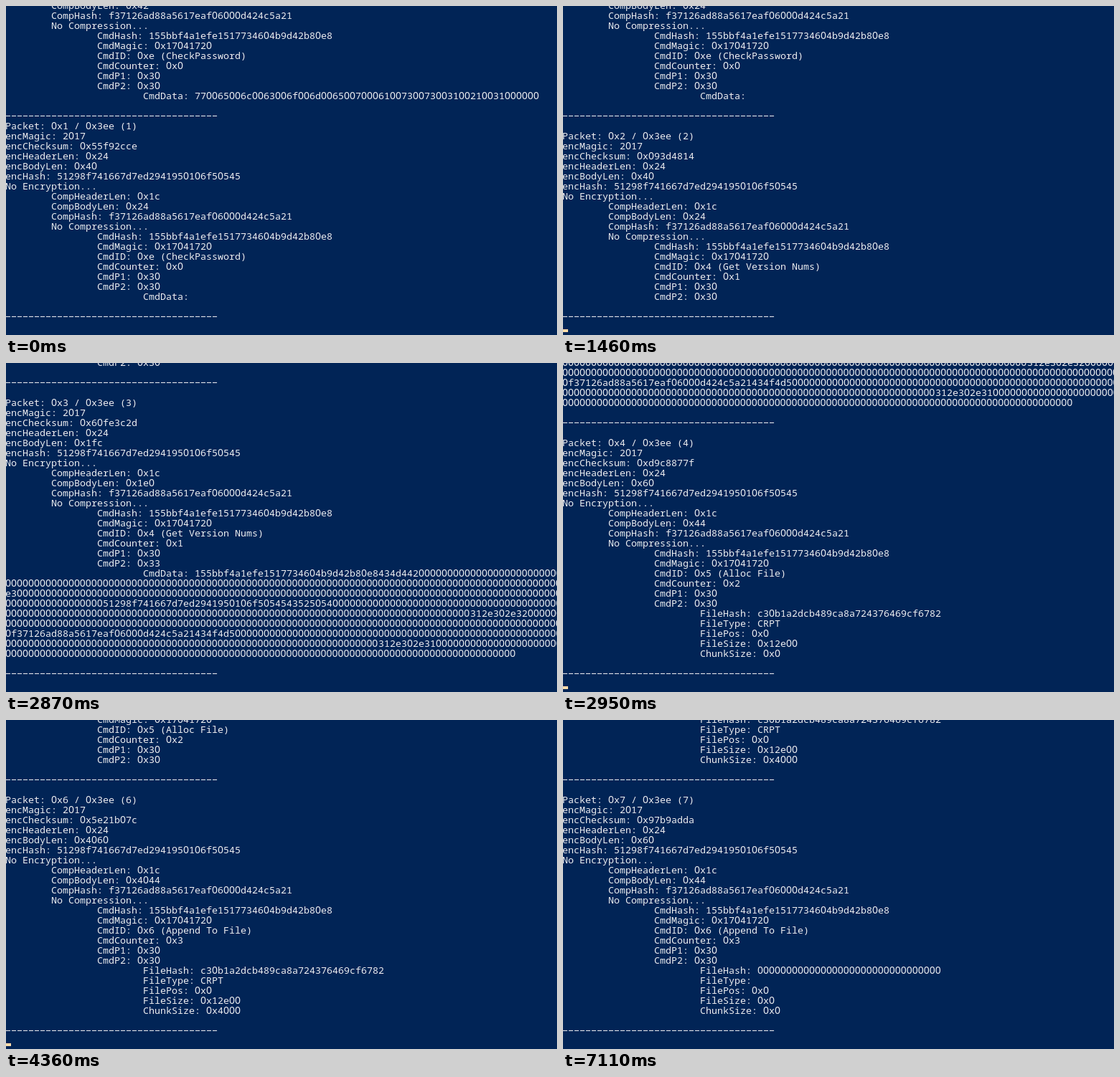
Animation, 768 px wide and 459 px high, one loop 7.28 s. Source, as an HTML page:

```html
<!DOCTYPE html>
<html lang="en">
<head>
<meta charset="utf-8">
<title>Packet log</title>
<style>
  html, body { margin: 0; width: 100%; height: 100%; overflow: hidden; background: #012456; }
  svg { display: block; }
  text { font: 500 13.333px "Noto Sans Mono", "DejaVu Sans Mono", monospace; fill: #eeedf0; }
  .zero { font: 500 13.986px "Noto Sans", "Open Sans", sans-serif; }
</style>
</head>
<body>
<svg width="768" height="459" viewBox="0 0 768 459">
  <rect width="768" height="459" fill="#012456"/>
  <g id="log"></g>
  <rect id="cursor" y="451" width="7" height="4" fill="#fedba9"/>
</svg>
<script>
const NS = "http://www.w3.org/2000/svg";
const LOOP = 7280, CELL = 8, LINE = 14, LEFT = -1, COLUMNS = 104, LAST_BASELINE = 438;
const COMP_HEADER = 0x1c, CMD_HEADER = 0x24;

const ENC_HASH = "51298f741667d7ed2941950106f50545";
const COMP_HASH = "f37126ad88a5617eaf06000d424c5a21";
const CMD_HASH = "155bbf4a1efe1517734604b9d42b80e8";
const FILE_HASH = "c30b1a2dcb489ca8a724376469cf6782";

const hex = n => "0x" + n.toString(16);
const asciiHex = s => [...s].map(c => c.charCodeAt(0).toString(16)).join("");
const wideHex = s => [...s, "\0"].map(c => c.charCodeAt(0).toString(16).padStart(2, "0") + "00").join("");
const moduleHex = (hash, type, version) =>
  ((hash + asciiHex(type)).padEnd(168, "0") + asciiHex(version)).padEnd(296, "0");

const versions = moduleHex(CMD_HASH, "CMD ", "1.0.0")
  + moduleHex(ENC_HASH, "CRPT", "1.0.2")
  + moduleHex(COMP_HASH, "COMP", "1.0.1");

const file = (hash, type, size, chunk) => [
  "FileHash: " + hash, "FileType: " + type, "FilePos: 0x0",
  "FileSize: " + hex(size), "ChunkSize: " + hex(chunk)
];

const CHECK = "0xe (CheckPassword)", VERSION = "0x4 (Get Version Nums)";
const ALLOC = "0x5 (Alloc File)", APPEND = "0x6 (Append To File)";

// at: moment the packet is printed; size: payload bytes
const packets = [
  { at: 0, sum: "2c6e11a4", cmd: CHECK, size: 30, data: ["CmdData: " + wideHex("welcomepass1!1")] },
  { at: 0, sum: "55f92cce", cmd: CHECK, size: 0, data: ["CmdData:"], tight: true },
  { at: 1460, sum: "093d4814", cmd: VERSION, size: 0 },
  { at: 2160, sum: "60fe3c2d", cmd: VERSION, size: 444, p2: "0x33", data: ["CmdData: " + versions] },
  { at: 2950, sum: "d9c8877f", cmd: ALLOC, size: 32, data: file(FILE_HASH, "CRPT", 0x12e00, 0) },
  { at: 3650, sum: "843f4ce7", cmd: ALLOC, size: 0 },
  { at: 4360, sum: "5e21b07c", cmd: APPEND, size: 0x4020, data: file(FILE_HASH, "CRPT", 0x12e00, 0x4000) },
  { at: 5310, sum: "97b9adda", cmd: APPEND, size: 32, data: file("0".repeat(32), "", 0, 0) }
];

const cursorOn = [[1290, 2870], [2950, 5000], [5310, 6100], [6570, 7110]];

const indent = (depth, lines) => lines.map(s => " ".repeat(8 * depth) + s);
const wrap = s => s.match(new RegExp(`.{1,${COLUMNS}}`, "g")) || [""];

function packetLines(p, i) {
  const body = CMD_HEADER + p.size;
  return [
    ...(p.tight ? [] : [""]),
    `Packet: ${hex(i)} / 0x3ee (${i})`,
    "encMagic: 2017",
    "encChecksum: 0x" + p.sum,
    "encHeaderLen: 0x24",
    "encBodyLen: " + hex(body + COMP_HEADER),
    "encHash: " + ENC_HASH,
    "No Encryption...",
    ...indent(1, [
      "CompHeaderLen: " + hex(COMP_HEADER),
      "CompBodyLen: " + hex(body),
      "CompHash: " + COMP_HASH,
      "No Compression..."
    ]),
    ...indent(2, [
      "CmdHash: " + CMD_HASH,
      "CmdMagic: 0x17041720",
      "CmdID: " + p.cmd,
      "CmdCounter: " + hex(i >> 1),
      "CmdP1: 0x30",
      "CmdP2: " + (p.p2 || "0x30")
    ]),
    ...indent(3, p.data || []),
    "",
    "\u2212".repeat(37)
  ].flatMap(wrap);
}

function add(parent, tag, attrs, content = "") {
  const el = document.createElementNS(NS, tag);
  for (const key in attrs) el.setAttribute(key, attrs[key]);
  el.textContent = content;
  return parent.appendChild(el);
}

// Runs start on their own character cell; zeros use a face without a slash.
function addLine(parent, line, row) {
  const text = add(parent, "text", { y: row * LINE });
  for (const run of line.matchAll(/0+|[^0\s]+/g)) {
    const attrs = { x: LEFT + run.index * CELL };
    if (run[0][0] === "0") attrs.class = "zero";
    add(text, "tspan", attrs, run[0]);
  }
}

const log = document.getElementById("log");
const cursor = document.getElementById("cursor");
let rows = 0;
packets.forEach((p, i) => {
  p.group = add(log, "g", {});
  for (const line of packetLines(p, i)) addLine(p.group, line, rows++);
  p.lastRow = rows - 1;
});

function render(t) {
  let last;
  for (const p of packets) {
    const printed = t >= p.at;
    p.group.style.display = printed ? "" : "none";
    if (printed) last = p;
  }
  log.setAttribute("transform", `translate(0 ${LAST_BASELINE - last.lastRow * LINE})`);
  cursor.style.display = cursorOn.some(([from, to]) => t >= from && t < to) ? "" : "none";
}

const start = performance.now();
function tick() {
  render((performance.now() - start) % LOOP);
  requestAnimationFrame(tick);
}
tick();
</script>
</body>
</html>
```
